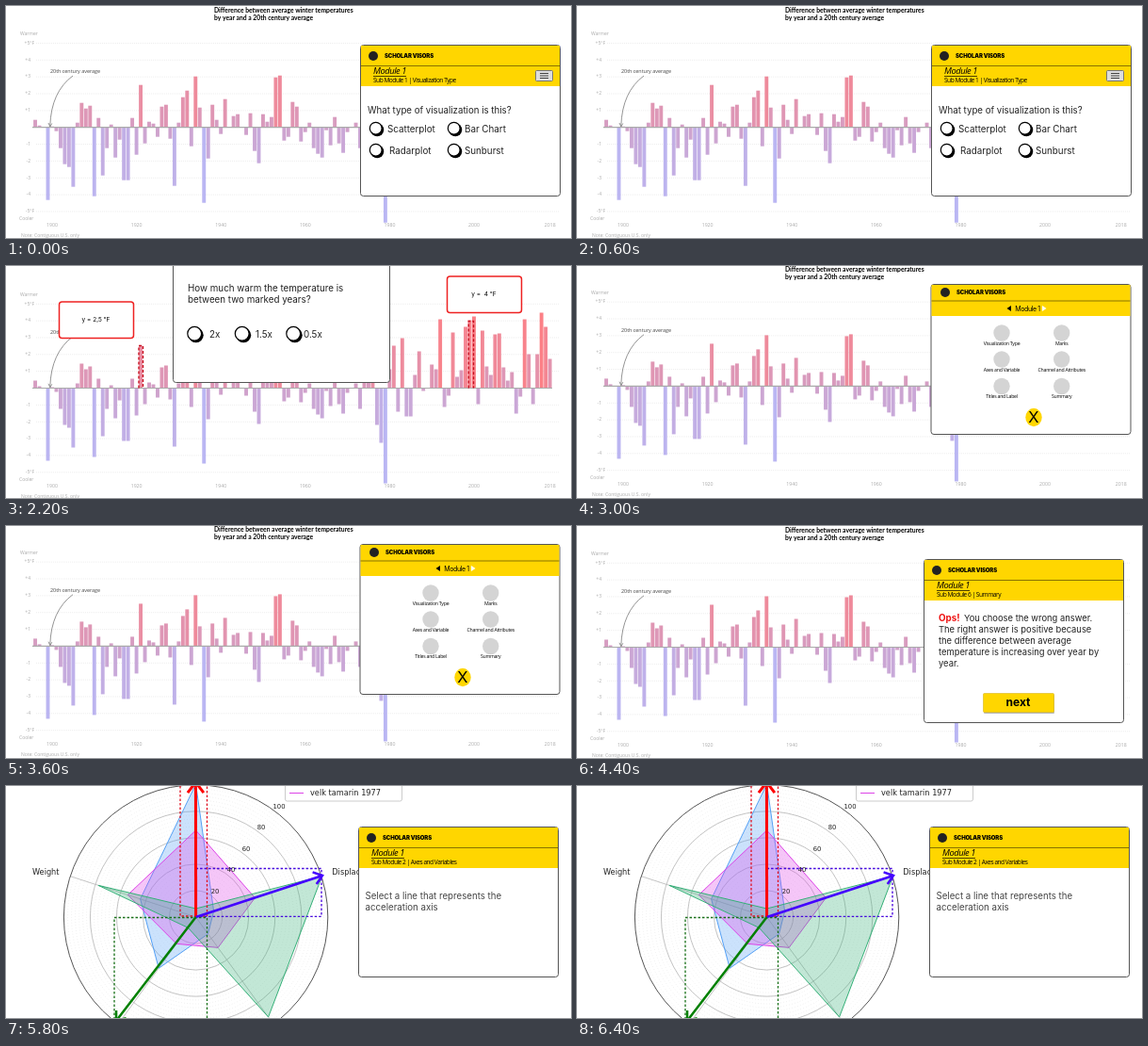
These frames come from a looping animation (600 px wide and 246 px high, 6600 ms). An HTML page with a canvas:

```html
<!DOCTYPE html>
<html lang="en">
<head>
<meta charset="utf-8">
<title>Chart lessons</title>
<style>
html, body { margin: 0; width: 100%; height: 100%; overflow: hidden; background: #fff; }
canvas { display: block; }
</style>
</head>
<body>
<canvas id="stage" width="600" height="246"></canvas>
<script>
const ctx = document.getElementById('stage').getContext('2d');
const YELLOW = '#ffd600', INK = '#222';
const INTER = 'Inter, sans-serif', OPEN = '"Open Sans", sans-serif', DEJAVU = '"DejaVu Sans", sans-serif';

// Bar heights in pixels, one per winter from 1896 to 2018.
const bars = [
  8, 2, 0, -77, 1, -4, -22, -39, -42, -63, 5, 26, 20, 23, -73, 10, -51, -22, 3, -32,
  -13, -56, -56, 10, -29, 45, -17, 6, 4, -10, 22, 24, -12, -62, 5, 32, 39, -20, 54, 21,
  -80, -33, 24, 8, -7, 30, 0, 12, 14, 0, -8, 15, -25, -38, 14, 6, 11, 53, 55, -14,
  -10, 27, 22, -15, -5, 5, -22, -28, -32, -3, -19, 11, -17, -27, -5, 0, 5, -22, 16, 12,
  42, -39, -58, -101, 20, 45, -25, 53, -30, -30, 14, 39, -3, 0, 25, 20, 73, -20, -8, 59,
  12, 19, 65, 72, 76, -17, 61, 23, 14, 57, 58, 22, 8, 17, -27, -9, 73, 36, -17, 36,
  80, 65, 31];
const BASE = 128.7, UNIT = 17.85, STEP = 4.48;
const barX = i => 31.1 + STEP * i;

function text(str, x, y, size, { color = INK, font = INTER, style = '', align = 'left', gap = 0 } = {}) {
  ctx.font = `${style} ${size}px ${font}`;
  ctx.fillStyle = color;
  ctx.textAlign = align;
  ctx.textBaseline = 'middle';
  ctx.letterSpacing = gap + 'px';
  ctx.fillText(str, x, y);
}

function line(points, color, width = 1, dash = []) {
  ctx.beginPath();
  points.forEach(([x, y]) => ctx.lineTo(x, y));
  ctx.strokeStyle = color;
  ctx.lineWidth = width;
  ctx.setLineDash(dash);
  ctx.stroke();
  ctx.setLineDash([]);
}

function box(x, y, w, h, fill, stroke, radius = 0, width = 1) {
  ctx.beginPath();
  ctx.roundRect(x, y, w, h, radius);
  ctx.fillStyle = fill;
  ctx.fill();
  if (!stroke) return;
  ctx.strokeStyle = stroke;
  ctx.lineWidth = width;
  ctx.stroke();
}

function disc(x, y, r, fill, stroke, width = 1) {
  ctx.beginPath();
  ctx.arc(x, y, r, 0, 7);
  if (fill) { ctx.fillStyle = fill; ctx.fill(); }
  if (stroke) { ctx.strokeStyle = stroke; ctx.lineWidth = width; ctx.stroke(); }
}

function barColor(v) {
  const end = v > 0 ? [252, 128, 134] : [186, 182, 243];
  const t = Math.min(1, Math.abs(v) / 80);
  return `rgb(${[210, 160, 200].map((c, k) => Math.round(c + (end[k] - c) * t))})`;
}

function barChart(shift) {
  const pale = { color: '#aaa', font: OPEN };
  ctx.save();
  ctx.translate(0, shift);
  const title = { color: '#000', font: 'Lato, sans-serif', style: 'bold' };
  text('Difference between average winter temperatures', 221, 5, 6.75, title);
  text('by year and a 20th century average', 221, 13, 6.75, title);
  text('Warmer', 15, 30, 5, pale);
  text('Cooler', 14, 225.5, 5, pale);
  text('Note: Contiguous U.S. only', 16, 244, 5, pale);
  for (let k = -5; k <= 5; k++) {
    const y = BASE - k * UNIT;
    if (!k) continue;
    line([[32, y], [588, y]], '#e6e6e6', 0.7, [1, 1]);
    const label = (k > 0 ? '+' : '') + k + (Math.abs(k) === 5 ? '°F' : '');
    text(label, Math.abs(k) === 5 ? 30 : 26, y, 5, { ...pale, align: 'right' });
  }
  for (const year of [1900, 1920, 1940, 1960, 1980, 2000, 2018])
    text(year, barX(year - 1896), 233, 5.2, { ...pale, align: 'center' });
  bars.forEach((v, i) => {
    ctx.fillStyle = barColor(v);
    ctx.fillRect(barX(i) - 2, BASE - Math.max(v, 0), 3.9, Math.abs(v));
  });
  line([[28, BASE], [580, BASE]], '#aaa', 1.2);
  text('20th century average', 47, 69.5, 5.4, { color: '#444', font: OPEN });
  ctx.beginPath();
  ctx.moveTo(71, 74);
  ctx.quadraticCurveTo(48, 91, 46.8, 127);
  ctx.strokeStyle = '#666';
  ctx.lineWidth = 0.7;
  ctx.stroke();
  line([[45, 124], [46.8, 128], [48.8, 124.5]], '#666', 0.7);
  ctx.restore();
}

const mark = (left, right, base, end, color) =>
  line([[left, base], [left, end], [right, end], [right, base]], color, 1.4, [3, 2]);

const panel = (x, y, w, h) => box(x + .5, y + .5, w, h, '#fff', '#555', 3);

function header(x, y, h, lineY) {
  ctx.fillStyle = YELLOW;
  ctx.fillRect(x + 1, y + 1, 211, h);
  line([[x + 1, lineY], [x + 212, lineY]], '#6b5a00', .8);
}

function brand(x, y) {
  disc(x + 9, y, 5, INK);
  text('SCHOLAR VISORS', x + 21, y + .5, 6, { color: '#000', style: '900', gap: -.15 });
}

function lesson(x, y, h, sub) {
  panel(x, y, 212, h);
  header(x, y, 43, y + 22.5);
  brand(x + 5, y + 12);
  text('Module 1', x + 14, y + 29, 9.4, { color: '#000', font: OPEN, style: 'italic', gap: -.45 });
  line([[x + 14, y + 33.5], [x + 49, y + 33.5]], '#000', .7);
  text(sub, x + 14, y + 38, 6.6, { color: '#000', font: OPEN, gap: -.5 });
}

function choice(x, y, r, label, labelX, size) {
  disc(x + 1.2, y + 1.3, r, '#000');
  disc(x - .3, y - .3, r - .6, '#fff', '#000', 1.2);
  text(label, labelX, y + 1, size);
}

function nextButton() {
  box(432, 179, 75, 20, '#bbb', null, 1);
  box(431.5, 177.5, 75, 20, YELLOW, '#d8b820', 1, .6);
  text('next', 468.5, 187.5, 12, { color: '#000', style: 'bold', align: 'center' });
}

function chartQuiz() {
  barChart(0);
  lesson(376, 41, 160, 'Sub Module 1 | Visualization Type');
  box(562.5, 68.5, 18, 11, '#ddd', '#777', 1);
  for (const y of [71.5, 74, 76.5]) line([[567, y], [576, y]], '#333', .9);
  text('What type of visualization is this?', 384, 111, 9.7);
  choice(393, 130, 7, 'Scatterplot', 405, 9.8);
  choice(476, 130, 7, 'Bar Chart', 487, 9.8);
  choice(393, 153, 7, 'Radarplot', 407, 9.8);
  choice(476, 153, 7, 'Sunburst', 487, 9.8);
}

function barQuiz() {
  barChart(-8.4);
  mark(208.5, 214.5, 120.3, 201, '#f0c');
  mark(400.5, 406.5, 120.3, 220, '#f00');
  mark(494.5, 500.5, 120.3, 44, '#f00');
  mark(566.5, 572.5, 120.3, 40, '#080');
  panel(40, -60, 200, 122);
  text('year on 20th century?', 55, 3, 10);
  text('Click on the correct bar!', 55, 26, 10);
}

function ratioQuiz() {
  barChart(.8);
  mark(141, 145.5, 129.5, 84.5, '#c81020');
  mark(491.3, 496.5, 129.5, 58.5, '#c81020');
  panel(177, -40, 230, 163);
  text('How much warm the temperature is', 193, 24, 9.8);
  text('between two marked years?', 193, 36, 9.8);
  choice(200.5, 72, 8, '2x', 216, 9.8);
  choice(251, 72, 8, '1.5x', 265, 9.8);
  choice(305.5, 72, 8, '0.5x', 316, 9.8);
  for (const [x, y, label] of [[56, 38, 'y = 2,5 °F'], [468, 11, 'y =  4 °F']]) {
    box(x + .5, y, 79, 38.5, '#fff', '#e22', 3, 1.5);
    text(label, x + 39.5, y + 19.5, 6.5, { align: 'center', color: '#000' });
  }
}

function menu() {
  barChart(-1.3);
  panel(375.5, 19, 212, 159);
  header(375.5, 19, 33, 37);
  brand(382, 28);
  text('Module 1', 478.5, 45.5, 7, { align: 'center', color: '#000', gap: -.4 });
  for (const [x, dir, color] of [[459, -1, '#000'], [496, 1, '#fff']]) {
    ctx.fillStyle = color;
    ctx.beginPath();
    ctx.moveTo(x + 2.5 * dir, 45);
    ctx.lineTo(x - 2 * dir, 42);
    ctx.lineTo(x - 2 * dir, 48);
    ctx.fill();
  }
  const rows = [
    [71, 83, 'Visualization Type', 'Marks'],
    [99, 111, 'Axes and Variable', 'Channel and Attributes'],
    [127.5, 139, 'Titles and Label', 'Summary']];
  for (const [y, labelY, ...labels] of rows)
    labels.forEach((label, k) => {
      const x = 451 + 63.7 * k;
      disc(x, y, 8.7, '#d4d4d4');
      text(label, x, labelY, 5.2, { align: 'center', color: '#000', font: OPEN, gap: -.25 });
    });
  ctx.beginPath();
  ctx.ellipse(485, 160.5, 8.7, 9.7, 0, 0, 7);
  ctx.fillStyle = YELLOW;
  ctx.fill();
  text('X', 485, 161.5, 16.5, { align: 'center', color: '#000' });
}

function wrongAnswer() {
  barChart(-.2);
  lesson(368, 35, 173, 'Sub Module 6 | Summary');
  text('Ops!', 384, 98.5, 9.8, { color: '#e11', style: 'bold' });
  text('You choose the wrong answer.', 411, 98.5, 9.4);
  ['The right answer is positive because', 'the difference between average',
    'temperature is increasing over year by', 'year.']
    .forEach((row, k) => text(row, 384, 110.5 + 12 * k, 9.4));
  nextButton();
}

function wrongMark() {
  barChart(1);
  lesson(368, 35, 173, 'Sub Module 6 | Summary');
  text('Ops!', 384, 133.5, 9.6, { color: '#e11', style: 'bold' });
  text('You click on wrong mark.', 409, 133.5, 9.6);
  nextButton();
}

function arrow(from, to, color, width, head) {
  const angle = Math.atan2(to[1] - from[1], to[0] - from[0]);
  const barb = turn => [to[0] - head * Math.cos(angle + turn), to[1] - head * Math.sin(angle + turn)];
  line([from, to], color, width);
  line([barb(.65), to, barb(-.65)], color, width);
}

function radar() {
  const cx = 201.6, cy = 139, R = 140.2;
  const at = (deg, r) => [cx + r * Math.cos(deg * Math.PI / 180), cy - r * Math.sin(deg * Math.PI / 180)];
  const angles = [90, 18, 306, 234, 162];
  for (let r = 4; r < R; r += 4) {
    ctx.setLineDash([.6, 2.4]);
    disc(cx, cy, r, null, '#ccc', .5);
  }
  ctx.setLineDash([]);
  for (let k = 1; k < 5; k++) disc(cx, cy, R * k / 5, null, '#b5b5b5', .8);
  for (const a of angles) line([[cx, cy], at(a, R)], '#b5b5b5', .8);
  const shapes = [
    ['#55a0f5', 141, 20, 22, 67, 62],
    ['#dd44e8', 92, 66, 40, 35, 76],
    ['#35b078', 9, 141, 131, 14, 109]];
  for (const [color, ...radii] of shapes) {
    const points = radii.map((r, k) => at(angles[k], r));
    line([...points, points[0]], color, 1);
    ctx.globalAlpha = .3;
    ctx.fillStyle = color;
    ctx.fill();
    ctx.globalAlpha = 1;
  }
  disc(cx, cy, R, null, '#444', .9);
  const dots = [2.5, 2];
  line([[185, 0], [185, 138], [213.5, 138], [213.5, 0]], '#e01020', 1.3, dots);
  line([[cx, 87.5], [335, 87.5], [335, 138.3], [cx, 138.3]], '#40d', 1.3, dots);
  line([[213.5, 246], [213.5, 139.5], [115, 139.5], [115, 246]], '#187018', 1.3, dots);
  arrow([cx, cy], [201.4, -4], '#f00', 3, 14);
  arrow([cx, cy], [336, 95], '#40f', 2.5, 11);
  arrow([cx, cy], [117, 249], '#008000', 2.5, 11);
  const plot = { font: DEJAVU };
  [[222, 112], [239, 89.5], [255, 67], [271, 44.5], [290, 22]]
    .forEach(([x, y], k) => text(20 * (k + 1), x, y, 6.8, { ...plot, align: 'center' }));
  text('Weight', 28, 91.5, 8.2, plot);
  text('Displacement', 346.3, 91.5, 8.2, plot);
  box(296.5, -20, 124, 36, '#fff', '#ccc', 2);
  line([[301, 7.5], [316, 7.5]], '#dd44e8', 1);
  text('velk tamarin 1977', 323, 7.5, 8.2, plot);
  lesson(374, 43, 159, 'Sub Module 2 | Axes and Variables');
  text('Select a line that represents the', 381.5, 117.5, 9.7, { color: '#444' });
  text('acceleration axis', 381.5, 129.5, 9.7, { color: '#444' });
}

const LOOP = 6600;
const slides = [
  [0, chartQuiz], [800, barQuiz], [1800, ratioQuiz], [2600, menu],
  [3800, wrongAnswer], [4800, wrongMark], [5800, radar]];

function render() {
  const time = performance.now() % LOOP;
  const [, draw] = slides.findLast(([start]) => start <= time);
  ctx.fillStyle = '#fff';
  ctx.fillRect(0, 0, 600, 246);
  draw();
  requestAnimationFrame(render);
}
render();
</script>
</body>
</html>
```
